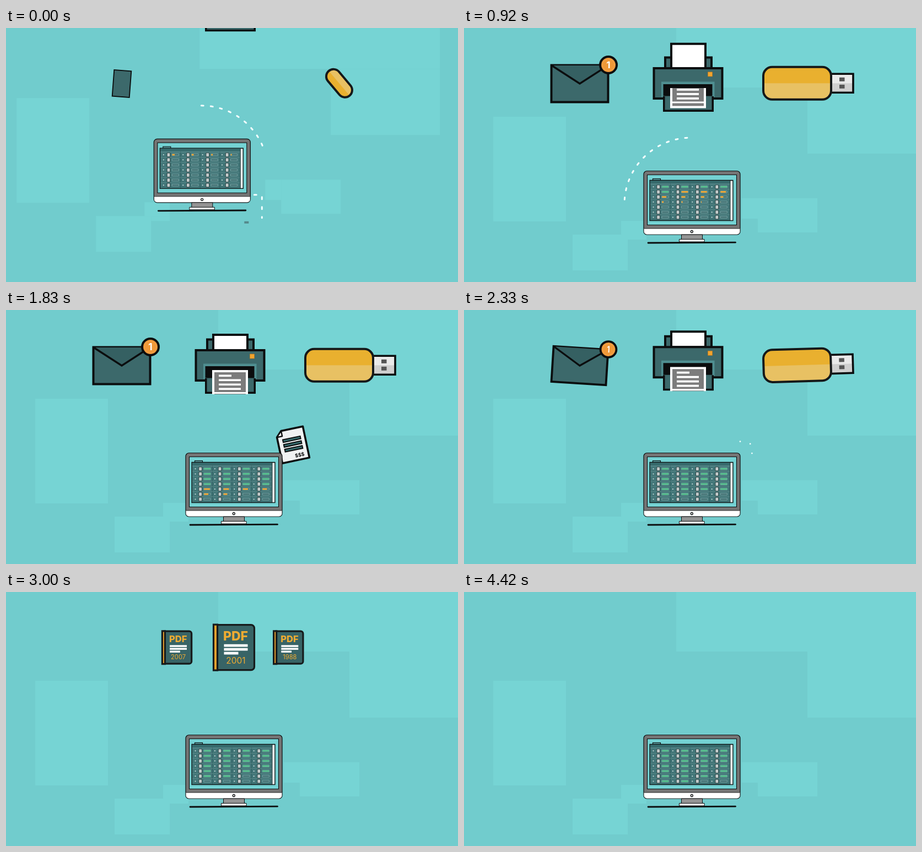
An HTML page with a canvas for the animation above (4.46 s loop, 820 by 461 pixels).

```html
<!DOCTYPE html>
<html lang="en">
<head>
<meta charset="utf-8">
<title>Documents flowing into a computer</title>
<style>
  html, body { margin: 0; width: 100%; height: 100%; overflow: hidden; background: #71cccd; }
  canvas { display: block; width: 820px; height: 461px; }
</style>
</head>
<body>
<canvas id="stage" width="820" height="461"></canvas>
<script>
const LOOP = 4460;
const INK = '#0b0d0e', TEAL = '#3c696b', ORANGE = '#f0a52f', GREEN = '#52c08a';
const c = document.getElementById('stage').getContext('2d');

// Timing helpers
const phase = (t, a, b) => Math.min(1, Math.max(0, (t - a) / (b - a)));
const cube = u => u * u * u;
const out = u => 1 - cube(1 - u);
const back = u => 1 + 2.1 * cube(u - 1) + 1.1 * (u - 1) ** 2;
const spring = t => Math.exp(-t / 130) * Math.cos(Math.PI * t / 420);
const mix = (a, b, u) => a + (b - a) * u;

function track(t, keys) {
  let i = 0;
  while (i < keys.length - 2 && t > keys[i + 1][0]) i++;
  const a = keys[i], b = keys[i + 1], u = phase(t, a[0], b[0]);
  return a.slice(1).map((v, j) => mix(v, b[j + 1], u));
}

// Drawing helpers
function paint(fill, stroke, width) {
  if (fill) { c.fillStyle = fill; c.fill(); }
  if (stroke) { c.strokeStyle = stroke; c.lineWidth = width; c.stroke(); }
}
function box(x, y, w, h, fill, stroke, width, r = 0) {
  c.beginPath();
  if (r) c.roundRect(x, y, w, h, r); else c.rect(x, y, w, h);
  paint(fill, stroke, width);
}
function disc(x, y, r, fill, stroke, width) {
  c.beginPath();
  c.arc(x, y, Math.max(0, r), 0, 7);
  paint(fill, stroke, width);
}
function line(pts, stroke, width, fill) {
  c.beginPath();
  pts.forEach(([x, y], i) => i ? c.lineTo(x, y) : c.moveTo(x, y));
  paint(fill, stroke, width);
}
function label(s, x, y, font, fill) {
  c.font = font + ' Inter, "Open Sans", sans-serif';
  c.textAlign = 'center';
  c.textBaseline = 'alphabetic';
  c.fillStyle = fill;
  c.fillText(s, x, y);
}
function at(x, y, deg, scale, draw) {
  if (scale <= 0.01) return;
  c.save();
  c.translate(x, y);
  c.rotate(deg * Math.PI / 180);
  c.scale(scale, scale);
  draw();
  c.restore();
}
function burst(t, start, x, y, rays) {
  const u = phase(t, start, start + 230);
  if (u <= 0 || u >= 1) return;
  const d = 1.1 * out(u), r = 1.9 * Math.min(1, (1 - u) * 2.4);
  for (const [dx, dy] of rays) disc(x + dx * d, y + dy * d, r, '#f4ffff');
}

function backdrop(k) {
  c.fillStyle = '#71cccd';
  c.fillRect(0, 0, 820, 461);
  c.save();
  c.translate(-34 * k, -34 * k);
  c.fillStyle = '#76d4d4';
  for (const r of [
    [385, -10, 436, 118], [623, 108, 198, 120], [53, 161, 132, 190], [197, 375, 100, 65],
    [285, 350, 46, 25], [297, 375, 34, 9], [533, 309, 108, 62], [504, 309, 29, 37]
  ]) c.fillRect(...r);
  c.restore();
}

// Dashed ring around the monitor, drawn and then wiped clockwise
function ring(t) {
  const end = Math.min(360, 67 + 0.522 * t);
  const start = 360 * phase(t, 380, 1000) ** 2;
  c.lineCap = 'round';
  c.setLineDash([4, 13]);
  if (start < end) {
    const rad = a => (a - 90) * Math.PI / 180;
    c.beginPath();
    c.arc(412, 320, 121, rad(start), rad(end));
    paint(null, '#f4ffff', 3);
  }
  if (t < 130) {
    c.setLineDash([4, 14]);
    line([[508, 361], [522, 361], [522, 403]], '#f4ffff', 3);
    c.setLineDash([]);
    box(490, 409, 8, 4, '#54898b');
  }
  c.setLineDash([]);
  c.lineCap = 'butt';
}

function progress(row, col, t) {
  let start = -330 + row * 347 + col * 65;
  if (row === 5) start = col < 2 ? 1270 + col * 70 : 3130 + col * 45;
  if (row === 6) start = col < 2 ? 3400 + col * 150 : 1e5;
  return phase(t, start, start + 850);
}

function monitor(t) {
  box(326, 259.5, 175, 115.5, '#747474', INK, 1.2, 6);
  c.beginPath();
  c.roundRect(326.6, 364, 173.8, 10.4, [0, 0, 5, 5]);
  paint('#fff');
  line([[326.5, 364], [500.5, 364]], INK, 0.8);
  box(332.5, 266.5, 162, 91, '#74d2d3', INK, 1.1);
  disc(413.3, 369.5, 2, '#fff', INK, 1.3);
  box(394.5, 375, 38, 9, '#949494', INK, 1);
  box(390.5, 383.5, 45.5, 4.5, '#fff', INK, 1);
  c.lineCap = 'round';
  line([[334, 390], [492.5, 389.2]], INK, 2.8);
  c.lineCap = 'butt';

  box(342.5, 273.5, 14, 5, '#5aa0a2', INK, 1.1);
  box(337, 276.3, 151, 73.4, '#427678', INK, 1.2);
  box(338, 277, 145, 4.5, '#35696b');
  box(483, 277, 4.6, 72.2, '#e9f6f6', INK, 0.7);
  for (let x = 374.5; x < 450; x += 35.5) line([[x, 282], [x, 349]], '#2e5c5e', 0.9);
  for (let row = 0; row < 7; row++) {
    const y = 288.2 + row * 9.2;
    line([[338, y - 4.8], [482, y - 4.8]], '#6a9a9b', 0.7);
    line([[338, y + 4], [482, y + 4]], '#2e5c5e', 0.7);
    for (let col = 0; col < 4; col++) {
      const x = 359 + col * 35.4, p = progress(row, col, t);
      disc(x - 15.5, y, 1, '#d8e6e6');
      box(x - 9.2, y - 3.2, 5.6, 6.6, '#dfe4e4', '#1c3233', 0.9);
      line([[x - 8, y - 1], [x - 4.8, y - 1]], '#8c9b9b', 0.8);
      line([[x - 8, y + 1.2], [x - 4.8, y + 1.2]], '#8c9b9b', 0.8);
      box(x, y - 1.7, 12.2, 3.4, '#416f71', '#8bb5b5', 0.7);
      if (p > 0) box(x + 0.2, y - 1.4, 11.8 * p, 2.8, p < 1 ? ORANGE : GREEN);
    }
  }
}

function envelope(t) {
  const bye = cube(phase(t, 2200, 2590));
  const k = spring(t);
  at(210, 101, 95 * (k + bye), (1 - 0.54 * k) * (1 - bye), () => {
    box(-51.5, -33.5, 103, 67, TEAL, INK, 4);
    const flap = out(phase(t, 440, 700));
    if (flap) {
      const tip = mix(-33, 0, flap);
      line([[-51, -33], [0, tip], [51, -33]], INK, 3.4, '#356062');
    }
    const pop = t < 380 ? 0 : back(phase(t, 350, 580));
    if (pop > 0) at(52, -34, 0, pop, () => {
      disc(0, 0, 15, '#ef9838', INK, 4);
      c.setLineDash([1, 2]);
      disc(0, 0, 10.5, null, '#f7bd7b', 1);
      c.setLineDash([]);
      c.scale(1 - 0.3 * phase(t, 2200, 2350), 1);
      label('1', 0, 6, 'bold 17px', '#fff');
    });
  });
}

function printer(t) {
  const u = Math.max(0, (t - 2200) / 390);
  const y = -147 * spring(t) - 150 * cube(u);
  if (y < -220) return;
  const feed = phase(t, 580, 1110);
  c.save();
  c.translate(0, y);
  box(365, 53.5, 84, 30, TEAL, INK, 4);
  const top = mix(0, 45, feed);
  box(376, top, 62, 73 - top, '#fff', INK, 4);
  box(344.5, 73, 124, 55, TEAL, INK, 4);
  box(442.5, 80, 8, 8, ORANGE, '#c47a1d', 0.8);
  box(358, 97.5, 96.5, 28, '#4f8f91');
  box(361, 124, 92, 28, INK);
  box(364.5, 123, 85, 25.5, TEAL);
  box(361.5, 102, 89, 21.5, INK);
  box(374, 110, 65, 7, '#fff');
  if (feed > 0) {
    c.beginPath();
    c.rect(372, 109, 69, 44);
    c.clip();
    c.translate(0, 43 * (feed - 1));
    box(376, 111, 61, 48, '#7c7c7c', '#fff', 4);
    box(374, 149, 65, 3, '#fff');
    [23, 40, 40, 40].forEach((w, i) => box(386, 117.5 + 8 * i, w, 3.6, '#fff'));
  }
  c.restore();
}

function usb(t) {
  const arrive = 1 - cube(1 - phase(t, 0, 400));
  const bye = cube(phase(t, 2200, 2760));
  const k = arrive - bye;
  const w = mix(58, 123, k), h = mix(26, 59, k);
  at(604.5, 100.3, -131 * (1 - k), 1 - phase(t, 2690, 2770), () => {
    const plug = phase(k, 0.55, 0.97);
    if (plug > 0) {
      const x = w / 2 - 40 + 41 * plug;
      box(x - 4, -17, 43, 34, '#cfcfcf');
      box(x - 4, -17, 43, 17, '#e9e9e9');
      box(x - 4, -17, 43, 34, null, INK, 3.6);
      box(x + 14, -10.5, 9.5, 7, '#555');
      box(x + 14, 2.5, 9.5, 7, '#555');
    }
    const r = Math.min(h / 2, 16);
    box(-w / 2, -h / 2, w, h, '#e9b02f', null, 0, r);
    c.save();
    c.clip();
    box(-w / 2, 0, w, h, '#e8c163');
    c.restore();
    box(-w / 2, -h / 2, w, h, null, '#151819', 4, r);
  });
}

// Sheet with a folded top-left corner
function sheet(w, h) {
  const x = w / 2, y = h / 2, f = 10;
  c.lineJoin = 'round';
  line([[f - x, -y], [x, -y], [x, y], [-x, y], [-x, f - y], [f - x, -y], [x, -y]], INK, 3.6, '#f0f2f3');
  line([[f - x, -y], [f - x, f - y], [-x, f - y], [f - x, -y]], INK, 2.4, '#fff');
  c.lineJoin = 'miter';
}
function chartSheet() {
  sheet(50, 58);
  disc(9.5, -12, 9, '#35696b');
  c.beginPath();
  c.moveTo(9.5, -12);
  c.arc(9.5, -12, 9, -0.7, 2.3);
  paint('#e9b02f', '#35696b', 0.8);
  [15, 24, 18].forEach((h, i) => box(-17 + i * 9, 22 - h, 8, h, '#75cfd0'));
}
function textSheet() {
  sheet(50, 56);
  [24, 33, 33, 33, 33, 33, 18].forEach((w, i) =>
    box(i ? -17 : -8, -18.5 + i * 6, w, 2.7, INK));
}
function billSheet() {
  sheet(51, 59);
  for (let i = 0; i < 3; i++) box(-16, -13 + i * 9, 33, 5, '#35696b', INK, 2);
  label('$$$', 9, 24, 'bold 9px', INK);
}

const FLIGHTS = [
  [chartSheet, [[1100, 214, 112, -40, 0.25], [1260, 238, 178, -25, 0.85],
    [1460, 293.5, 259, -5, 1], [1720, 378, 310, 8, 0.8]]],
  [textSheet, [[1180, 406, 120, 0, 0.7], [1460, 409, 203.5, 14, 1], [1780, 413, 312, -6, 0.85]]],
  [billSheet, [[1240, 606, 108, 30, 0.25], [1460, 576, 206, -3, 1],
    [1800, 528, 238, -14, 1], [2140, 440, 312, 8, 0.8]]]
];

function flights(t) {
  for (const [draw, keys] of FLIGHTS) {
    if (t < keys[0][0] || t > keys[keys.length - 1][0]) continue;
    const [x, y, deg, scale] = track(t, keys);
    at(x, y, deg, scale, draw);
  }
}

function trails(t) {
  c.lineCap = 'round';
  if (t > 1320 && t < 1580) {
    const d = (t - 1460) / 14, s = Math.min(1, (1580 - t) / 100);
    for (const [x, y, dx, h] of [[242, 183, 1, 10], [236, 206, 2, 8], [263, 200, 1, 6]]) {
      line([[x + d, y + d], [x + dx * s + d, y + h * s + d]], '#f4ffff', 2.8);
    }
  }
  [[620, 134, 615, 150, 598, 163], [628, 142, 624, 160, 605, 172], [633, 163, 627, 176, 614, 182]]
    .forEach(([x, y, cx, cy, ex, ey], i) => {
      if (t < 1400 - i * 40 || t > 1610 - i * 40) return;
      c.beginPath();
      c.moveTo(x, y);
      c.quadraticCurveTo(cx, cy, ex, ey);
      paint(null, '#f4ffff', 2.8);
    });
  c.lineCap = 'butt';
}

// Outline keeps its weight whatever the size of the book
function book(year, size) {
  const edge = 3.2 / size;
  c.beginPath();
  c.roundRect(-31, -41, 68, 82, [0, 6, 6, 0]);
  paint('#386466', '#171b1c', edge);
  box(-37, -41.5, 7, 83, ORANGE, '#171b1c', edge);
  label('PDF', 3, -13, '800 23px', '#efab31');
  [43, 43, 26].forEach((w, i) => box(-18, -6 + i * 7, w, 4.8, '#fff'));
  label(year, 3.5, 29.3, '15.5px', '#efab31');
}

function books(t) {
  if (t < 2660) return;
  const drift = 0.0073 * (t - 3000);
  const shelf = [
    ['2007', 310 + drift, 0.72, 2690, 3850],
    ['1988', 512.3 - drift, 0.72, 2710, 3900],
    ['2001', 413.5, 1, 2660, 3680]
  ];
  for (const [year, x, size, start, leave] of shelf) {
    const fall = phase(t, leave + 120, leave + 400);
    if (t < start || fall === 1) continue;
    const lift = -27 * size * out(phase(t, leave, leave + 120));
    const f = fall * fall;
    at(mix(x, 413, f), mix(100.7 + lift, 306, f), 0,
      size * back(phase(t, start, start + 250)) * (1 - 0.35 * f * size), () => book(year, size));
  }
}

function sparkles(t) {
  const corner = [[0, -19], [17, -15], [20, 1]];
  burst(t, 2170, 501, 259, corner);
  burst(t, 1590, 326, 259, corner.map(([x, y]) => [-x, y]));
  burst(t, 3500, 287, 70, [[-12, -12], [4, -14], [-17, 6]]);
  burst(t, 3500, 536, 70, [[-6, -14], [12, -10], [14, 6]]);
}

function render(t) {
  const k = cube(1 - phase(t, 0, 550));
  backdrop(k);
  flights(t);
  envelope(t);
  printer(t);
  usb(t);
  trails(t);
  books(t);
  c.save();
  c.translate(-58 * k, -58.5 * k);
  ring(t);
  monitor(t);
  c.restore();
  sparkles(t);
}

const begin = performance.now();
function tick() {
  render((performance.now() - begin) % LOOP);
  requestAnimationFrame(tick);
}
tick();
</script>
</body>
</html>
```
